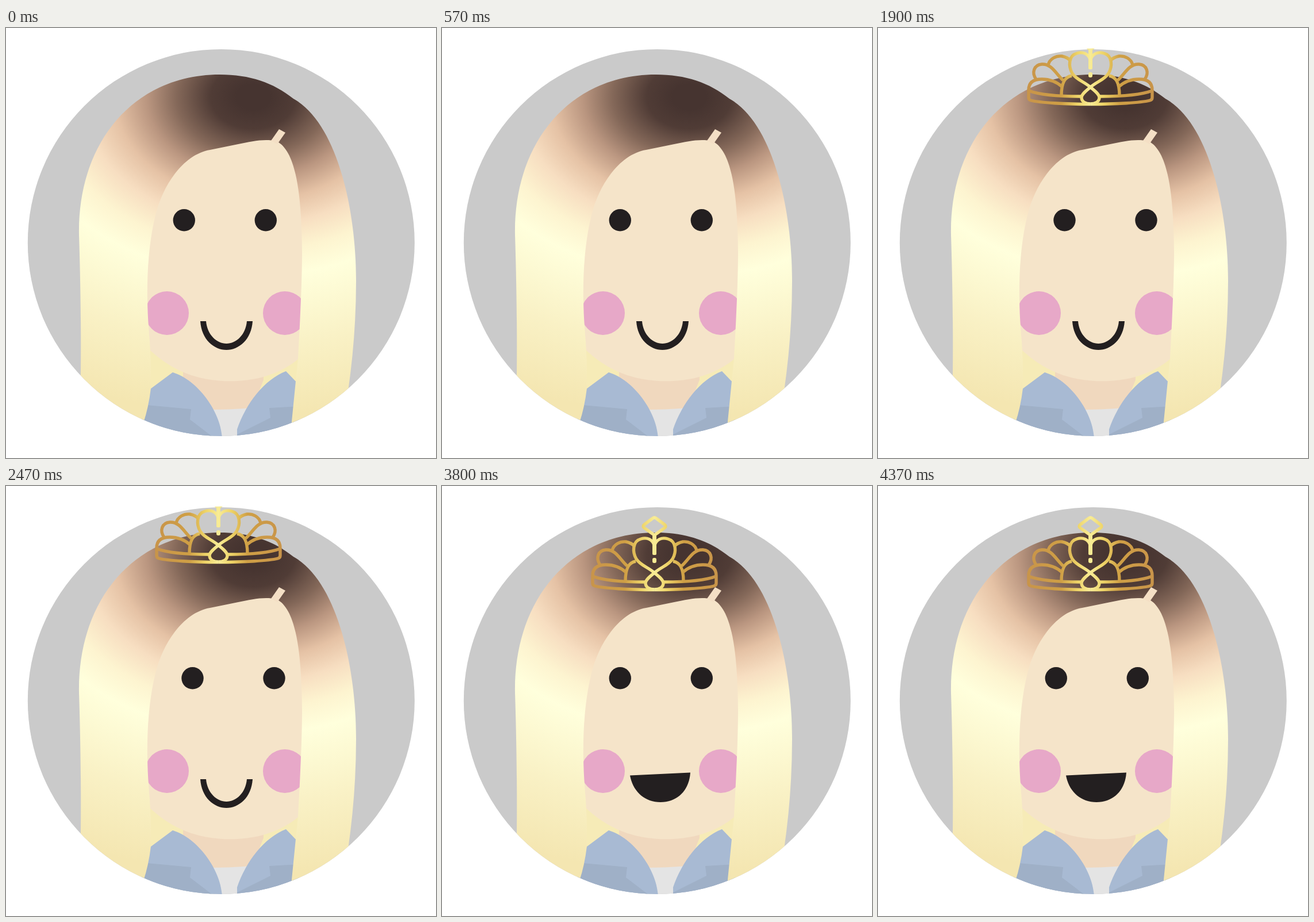
Animation, 748 px wide and 748 px high, one loop 4.75 s. Source, as an HTML page:

```html
<!DOCTYPE html>
<html lang="en">
<head>
<meta charset="utf-8">
<title>Princess portrait</title>
<style>
  html, body { margin: 0; height: 100%; overflow: hidden; background: #fff; }
  svg { display: block; width: 100%; height: 100%; }
</style>
</head>
<body>
<svg viewBox="0 0 748 748">
  <defs>
    <clipPath id="disc"><circle cx="374.3" cy="373.4" r="336.5"/></clipPath>
    <clipPath id="crownArea"><circle cx="374.3" cy="373.4" r="338"/></clipPath>
    <radialGradient id="hair" gradientUnits="userSpaceOnUse" cx="0" cy="0" r="740"
      gradientTransform="translate(430 120) scale(1 .75)">
      <stop offset=".04" stop-color="#463430"/>
      <stop offset=".1" stop-color="#503c36"/>
      <stop offset=".18" stop-color="#846859"/>
      <stop offset=".25" stop-color="#ba9680"/>
      <stop offset=".325" stop-color="#e5c2a5"/>
      <stop offset=".4" stop-color="#f7dec1"/>
      <stop offset=".48" stop-color="#fdf4d0"/>
      <stop offset=".56" stop-color="#ffffdc"/>
      <stop offset=".78" stop-color="#f9f1c5"/>
      <stop offset="1" stop-color="#f4e6b1"/>
    </radialGradient>
    <linearGradient id="gold" gradientUnits="userSpaceOnUse" x1="259" x2="480" y1="0" y2="0">
      <stop offset="0" stop-color="#c8944a"/>
      <stop offset=".27" stop-color="#cf9f45"/>
      <stop offset=".4" stop-color="#eed468"/>
      <stop offset=".5" stop-color="#f8ec96"/>
      <stop offset=".6" stop-color="#eed468"/>
      <stop offset=".75" stop-color="#cf9f45"/>
      <stop offset="1" stop-color="#c8944a"/>
    </linearGradient>
    <!-- left side of the crown, mirrored for the right -->
    <g id="crownHalf">
      <path d="M369.5 180.5C325 180.5 282 178 266 174Q262 173 262 169V156C262 141 273 137 285 137C299 137 311 142 320 150"/>
      <path d="M262 157C280 164 315 167 353 167"/>
      <path d="M319 165C319 143 325 133 337 131"/>
      <path d="M275 137C267 126 271 112 285 111C302 110 309 127 322 139"/>
      <path d="M296 112C299 101 310 96 320 97Q330 99 335 105"/>
      <path d="M369.5 104C366 92 356 89 346 92C331 96 331 115 338 127C345 138 358 141 369.5 151C377 157 385 163 385 169C385 176 378 180 369.5 180"/>
    </g>
  </defs>

  <g clip-path="url(#disc)">
    <rect width="748" height="748" fill="#cacaca"/>
    <path fill="#f6ebb7" d="M245 550H512V650H245z"/>
    <path fill="#f0d8be" d="M308 595H448V612L425 670H350L308 612z"/>
    <path fill="#e4e4e4" d="M355 664Q392 664 425 661V715H365z"/>
    <path fill="#a8bad3" d="M235 640L290 599C335 613 375 670 376 715H235zM402 715V698C418 652 449 612 487 597L510 621V715z"/>
    <path fill="#9fb0c7" d="M235 655L322 663L320 681L358 710V715H235zM510 658L458 661L460 678L402 707V715H510z"/>
    <path fill="#f5e4c9" d="M240 180H520V565C470 617 385 624 322 604Q280 590 246 556z"/>
    <g fill="#e7a8c8">
      <circle cx="280" cy="496" r="38"/>
      <circle cx="485" cy="496" r="38"/>
    </g>
    <path fill="url(#hair)" d="M130 605C131 510 129 420 127 360C124 200 222 81 372 81C424 81 465 95 500 123C574 164 609 310 609 440Q609 535 595 632L560 715H494L508 574C512 500 515 440 515 390C514 280 503 214 471 197C450 192 428 197 404 202L355 212C312 219 274 268 260 326C244 390 243 470 250 545Q253 590 252 627Q248 660 239 687L190 715L130 650z"/>
    <path fill="#f4dfc5" d="M475 176L486 182L472 202L461 196z"/>
  </g>

  <g fill="#231f20">
    <g id="eyes">
      <circle cx="309.8" cy="334.3" r="19.2"/>
      <circle cx="451.8" cy="334.3" r="19.2"/>
    </g>
    <path id="smile" d="M338 510H348C350 534 367 549 383.500 549S417 534 419 510H429C427 542 405 560 383.500 560S340 542 338 510z"/>
    <path id="laugh" d="M327 503.500L432 498.500C430 529 410 550 380 550C352 550 332 531 327 503.500z"/>
  </g>

  <g clip-path="url(#crownArea)">
    <g id="crown" fill="none" stroke="url(#gold)" stroke-width="5.400" stroke-linejoin="round">
      <use href="#crownHalf"/>
      <use href="#crownHalf" transform="matrix(-1 0 0 1 739 0)"/>
      <path d="M366 56.500Q369.500 53.500 373 56.500L387 67Q391 70 387 73L373 83Q369.500 86 366 83L352 73Q348 70 352 67z"/>
      <g fill="url(#gold)" stroke="none">
        <rect x="366" y="84" width="7" height="36" rx="2"/>
        <rect x="366" y="125" width="7" height="9" rx="3"/>
      </g>
    </g>
  </g>
</svg>
<script>
  const HOLD = 950;
  const poses = [
    { look: 0, crown: null },
    { look: -15, crown: -93 },
    { look: 14.7, crown: -48 },
    { look: 0, crown: 0 },
    { look: 0, crown: 0, laughing: true },
  ];
  const part = id => document.getElementById(id);
  const [eyes, smile, laugh, crown] = ['eyes', 'smile', 'laugh', 'crown'].map(part);
  const show = (el, on) => el.setAttribute('visibility', on ? 'visible' : 'hidden');

  function draw(now) {
    const pose = poses[Math.floor(now / HOLD) % poses.length];
    eyes.setAttribute('transform', `translate(${pose.look} 0)`);
    crown.setAttribute('transform', `translate(0 ${pose.crown ?? 0})`);
    show(crown, pose.crown !== null);
    show(smile, !pose.laughing);
    show(laugh, pose.laughing);
  }

  let start;
  function tick(now) {
    start ??= now;
    draw(now - start);
    requestAnimationFrame(tick);
  }
  draw(0);
  requestAnimationFrame(tick);
</script>
</body>
</html>
```
